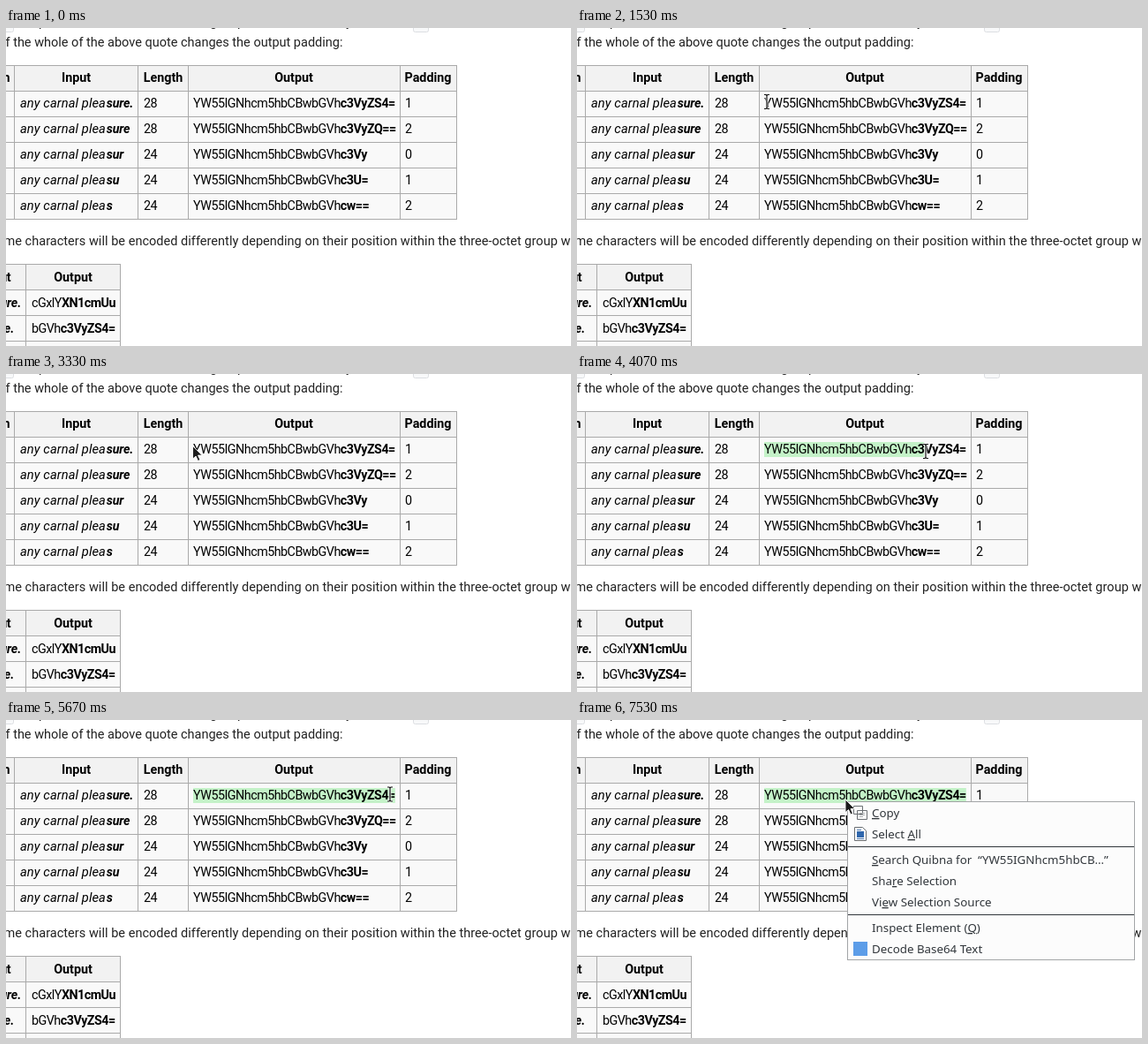
These frames come from a looping animation (640 px wide and 360 px high, 8 s). An HTML page:

```html
<!DOCTYPE html>
<html lang="en">
<head>
<meta charset="utf-8">
<title>Selecting Base64 text</title>
<style>
  html, body { margin: 0; width: 100%; height: 100%; overflow: hidden; background: #fff; }
  svg { display: block; width: 100%; height: 100%; }
  text { font: 14.3px Roboto, "Open Sans", sans-serif; letter-spacing: -.5px; fill: #000; white-space: pre; }
  .prose { font-size: 14.5px; letter-spacing: 0; fill: #222; }
  .long { letter-spacing: .03px; }
  .head { font-size: 14.3px; font-weight: 700; letter-spacing: 0; text-anchor: middle; }
  .bold { font-weight: 700; }
  .ital { font-size: 14.7px; font-style: italic; letter-spacing: .1px; }
  .strong { font-size: 14.2px; font-style: italic; font-weight: 700; letter-spacing: -.15px; }
  .end { text-anchor: end; }
  .line { fill: none; stroke: #aaa; shape-rendering: crispEdges; }
  .th { fill: #f2f2f2; }
  .td { fill: #f9f9f9; }
  #menu text { font: 13.33px "Noto Sans", "Open Sans", sans-serif; letter-spacing: 0; fill: #31363b; }
  .key { text-decoration: underline; }
</style>
</head>
<body>
<svg viewBox="0 0 640 360">
  <rect width="640" height="360" fill="#fff"/>

  <!-- line cut off by the top edge -->
  <g fill="#f8f9fa" stroke="#dcdee2">
    <rect x="-8.5" y="-12.5" width="17" height="17" rx="2"/>
    <rect x="461.5" y="-12.5" width="17" height="17" rx="2"/>
  </g>
  <text class="prose" y="-2"><tspan x="37">p</tspan><tspan x="231">g</tspan><tspan x="262">p</tspan><tspan x="385">y</tspan><tspan x="424">,</tspan></text>
  <text class="prose" x="-.5" y="21">f the whole of the above quote changes the output padding:</text>

  <!-- first table -->
  <rect class="th" y="42" width="510" height="29"/>
  <rect class="td" y="71" width="510" height="145"/>
  <path class="line" d="M0 42.5H511M0 71.5H511M0 100.5H511M0 129.5H511M0 158.5H511M0 187.5H511M0 216.5H511
    M9.5 42V217M149.5 42V217M206.5 42V217M446.5 42V217M510.5 42V217"/>
  <rect id="mark" x="212" y="77" width="0" height="17" fill="#c4f2c8"/>
  <text class="bold end" x="4" y="61">Length</text>
  <text class="head" x="79.5" y="61">Input</text>
  <text class="head" x="178" y="61">Length</text>
  <text class="head" x="326" y="61">Output</text>
  <text class="head" x="478" y="61">Padding</text>
  <g id="rows"></g>

  <text class="prose long" x="-2.5" y="246">me characters will be encoded differently depending on their position within the three-octet group w</text>

  <!-- second table -->
  <rect class="th" y="267" width="129" height="29"/>
  <rect class="td" y="296" width="129" height="64"/>
  <path class="line" d="M0 267.5H130M0 296.5H130M0 325.5H130M0 354.5H130M22.5 267V360M129.5 267V360"/>
  <text class="bold end" x="5" y="287">Input</text>
  <text class="head" x="76" y="287">Output</text>
  <text class="strong end" x="17" y="316">sure.</text>
  <text class="strong end" x="9" y="345">sure.</text>
  <text x="29" y="316">cGxlY<tspan class="bold">XN1cmUu</tspan></text>
  <text x="29" y="345">bGVh<tspan class="bold">c3VyZS4=</tspan></text>

  <g id="menu">
    <rect x="306.5" y="92.5" width="325" height="179" fill="#fcfcfc" stroke="#a3a5a7"/>
    <path d="M307 143.5H631M307 220.5H631" stroke="#31363b" shape-rendering="crispEdges"/>
    <g fill="#fcfcfc" stroke="#6b6f73">
      <path d="M313.5 97.5H323.5V106.5H313.5ZM317.5 102.5H328.5V112.5H317.5Z"/>
      <path d="M320 105.5H326M320 107.5H326M320 109.5H324" stroke="#a9acae"/>
      <path d="M314.5 121.5H323.5L327.5 125.5V136.5H314.5Z"/>
      <path d="M317 124.5H322M317 134.5H325" stroke="#4d79b0"/>
    </g>
    <rect x="317" y="126" width="8" height="7" fill="#2f67ad"/>
    <rect x="313" y="251" width="16" height="16" fill="#5c9de8"/>
    <text x="334" y="110"><tspan class="key">C</tspan>opy</text>
    <text x="334" y="134">Select <tspan class="key">A</tspan>ll</text>
    <text x="334" y="163"><tspan class="key">S</tspan>earch Quibna for</text>
    <text x="454" y="163">“YW55IGNhcm5hbCB…”</text>
    <text x="334" y="187">Sha<tspan class="key">r</tspan>e Selection</text>
    <text x="334" y="211">Vi<tspan class="key">e</tspan>w Selection Source</text>
    <text x="334" y="240">Inspect Element (<tspan class="key">Q</tspan>)</text>
    <text x="334" y="264">Decode Base64 Text</text>
  </g>

  <g id="pointer">
    <path id="arrow" d="M0 0V14.6L3.6 11.6L6 16.9L8.4 15.8L6 10.6H10.8Z" fill="#1c1c1c" stroke="#fff" stroke-width=".9"/>
    <g id="beam" fill="none">
      <path d="M-3 -8H3M0 -8V8M-3 8H3" stroke="#fff" stroke-width="3" stroke-opacity=".85"/>
      <path d="M-3 -8H-1L0 -7L1 -8H3M0 -7V7M-3 8H-1L0 7L1 8H3" stroke="#111" stroke-width="1.2"/>
    </g>
  </g>
</svg>
<script>
  const get = id => document.getElementById(id);

  // bold input ending, length, bold output ending, padding
  const rows = [
    ["sure.", 28, "c3VyZS4=", 1],
    ["sure", 28, "c3VyZQ==", 2],
    ["sur", 24, "c3Vy", 0],
    ["su", 24, "c3U=", 1],
    ["s", 24, "cw==", 2]
  ];
  get("rows").innerHTML = rows.map(([word, length, code, pad], i) => {
    const y = 90 + 29 * i;
    return `<text class="ital" x="16" y="${y}">any carnal plea<tspan class="strong" x="113.8">${word}</tspan></text>
      <text x="156" y="${y}">${length}</text>
      <text class="code" x="212" y="${y}">YW55IGNhcm5hbCBwbGVh<tspan class="bold">${code}</tspan></text>
      <text x="452" y="${y}">${pad}</text>`;
  }).join("");

  const LOOP = 8000, FPS = 15, DRAG = 3730, FULL = 4730, OPEN = 7530;
  const A = "arrow", B = "beam", LEFT = 212;

  // time, x, y and the pointer shape used from then on
  const path = [
    [0, 330, -30, A], [130, 296, 2, A], [330, 222, 48, A], [470, 187, 72, A],
    [600, 212, 80, B], [670, 224, 84, B], [870, 223, 84, B], [1130, 216, 83, B],
    [1470, 216, 83, B], [1530, 215, 83.5, B], [1670, 203, 82, A], [1800, 214, 83, B],
    [2070, 280, 86, B], [2270, 299, 87, B], [2400, 297, 87, B], [2800, 240, 84, B],
    [3070, 217, 82, B], [3200, 214, 82, B], [3270, 214, 82, B], [3330, 211.5, 81.5, A],
    [3470, 211.5, 81.5, A], [3530, 215, 83, B], [3670, 215, 83, B], [3730, 219, 83, B],
    [3930, 322, 86, B], [4070, 395, 87.5, B], [4270, 422, 87, B], [4470, 431, 85, B],
    [4600, 434, 84, B], [4730, 438, 84, B], [4800, 438, 84, B], [4870, 435, 84, B],
    [5130, 435, 84, B], [5200, 439, 85, B], [5330, 439, 85, B], [5400, 435, 84.5, B],
    [5600, 435, 84.5, B], [5670, 435, 84, B], [5740, 422, 77, A], [5930, 332, 76.5, A],
    [6000, 352, 76.5, A], [6470, 352, 76.5, A], [6530, 346, 77, A], [6730, 306, 81, A],
    [6800, 300, 81.5, A], [7470, 300, 81.5, A], [OPEN, 304, 90, A], [LOOP, 304, 90, A]
  ];

  function locate(t) {
    const n = path.findIndex(p => p[0] > t);
    const [t0, x0, y0, shape] = path[n - 1], [t1, x1, y1] = path[n];
    const k = (t - t0) / (t1 - t0);
    return { x: x0 + (x1 - x0) * k, y: y0 + (y1 - y0) * k, shape };
  }

  const code = document.querySelector(".code");

  // right edge of the last character whose middle lies left of x
  function snap(x) {
    let edge = LEFT;
    for (let i = 0; i < code.getNumberOfChars(); i++) {
      const a = code.getStartPositionOfChar(i).x, b = code.getEndPositionOfChar(i).x;
      if ((a + b) / 2 <= x) edge = b;
    }
    return edge;
  }

  function draw(time) {
    const step = Math.floor((time % LOOP + 4) * FPS / 1000) % (LOOP * FPS / 1000);
    const t = Math.round(step * 100 / FPS) * 10;
    const { x, y, shape } = locate(t);
    get("pointer").setAttribute("transform", `translate(${x.toFixed(1)} ${y.toFixed(1)})`);
    for (const id of [A, B]) get(id).style.display = id === shape ? "" : "none";
    get("menu").style.display = t < OPEN ? "none" : "";
    const edge = t < DRAG ? LEFT : snap(t < FULL ? x : 640);
    get("mark").setAttribute("width", edge - LEFT);
  }

  const start = performance.now();
  draw(0);
  requestAnimationFrame(function run(now) {
    draw(Math.max(0, now - start));
    requestAnimationFrame(run);
  });
</script>
</body>
</html>
```
